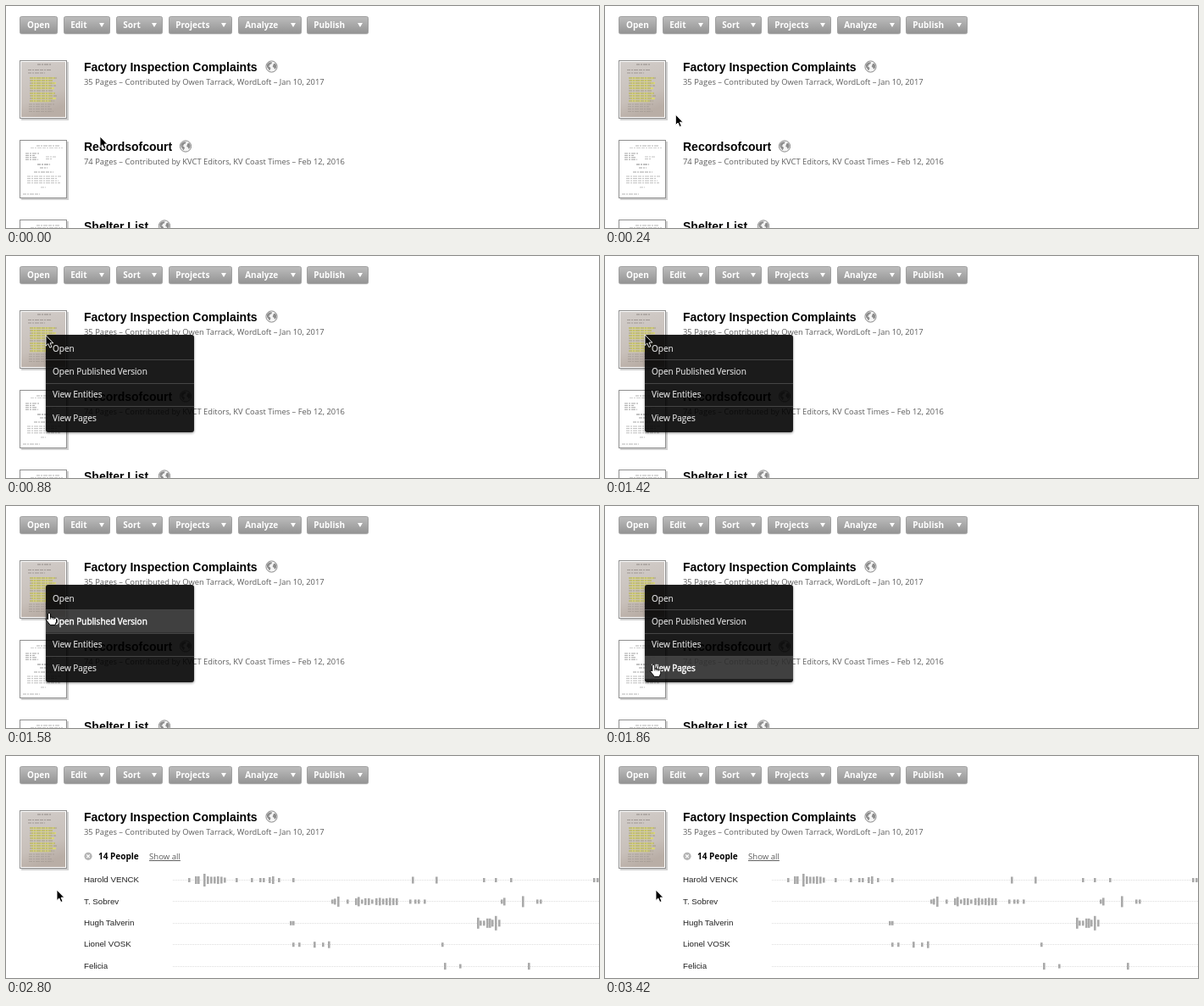
Write an HTML page that moves like this. It is 700 px wide and 262 px high and loops after 3.46 s.

```html
<!DOCTYPE html>
<html lang="en">
<head>
<meta charset="utf-8">
<title>Document list</title>
<style>
html, body { margin: 0; width: 100%; height: 100%; overflow: hidden; background: #fff; }
svg { display: block; }
text { font: 9.4px "Open Sans", sans-serif; white-space: pre; }
.title { font: bold 14px "Liberation Sans", Arial, sans-serif; }
.sub { fill: #5c5c5c; }
.button { font-size: 10px; font-weight: bold; fill: #fff; }
.name { font: 9.75px "Liberation Sans", Arial, sans-serif; fill: #222; }
.item { font-size: 10px; fill: #e4e4e4; stroke: #e4e4e4; stroke-width: .15; }
.item.on { fill: #fff; stroke: #fff; stroke-width: .45; }
</style>
</head>
<body>
<svg id="stage" width="700" height="262" viewBox="0 0 700 262">
  <defs>
    <linearGradient id="metal" x2="0" y2="1"><stop stop-color="#bdbdbd"/><stop offset="1" stop-color="#939393"/></linearGradient>
    <linearGradient id="photo" x2=".3" y2="1"><stop stop-color="#d2cdca"/><stop offset=".7" stop-color="#c8c0ba"/><stop offset="1" stop-color="#b9aea6"/></linearGradient>
    <filter id="soft" x="-10%" y="-10%" width="120%" height="125%"><feDropShadow dx="0" dy="1" stdDeviation="1.5" flood-opacity=".5"/></filter>
    <g id="globe">
      <circle r="6.6" fill="#f4f4f4" stroke="#8c8c8c"/>
      <path fill="#8c8c8c" d="M-5.5-2.5l2.5-2.5 3.5-.3-.5 2-2 .8-.3 1.5-1.7.5 2 1 1 1.5-1.5 3-1.5-2.5-1.5-2zM2.2-3l2-1 1.4 2.5v2.5l-1.8 2.5-1-2.2-1.6-1z"/>
    </g>
  </defs>
</svg>
<script>
const stage = document.getElementById('stage');
const LOOP = 3460, MENU_AT = 800, PANEL_AT = 2500;

const rect = (x, y, w, h, fill, more = '') =>
  `<rect x="${x}" y="${y}" width="${w}" height="${h}" fill="${fill}" ${more}/>`;
const text = (x, y, cls, s) => `<text x="${x}" y="${y}" class="${cls}">${s}</text>`;
const range = (n, f) => Array.from({ length: n }, (_, i) => f(i)).join('');

function button([label, x, w]) {
  const a = x + w - 13;
  return rect(x, 13, w, 20.6, '#d4d4d4', 'rx="2.5"') +
    rect(x + .5, 12.5, w - 1, 20, 'url(#metal)', 'rx="2" stroke="#a0a0a0"') +
    text(x + (label === 'Open' ? 9 : 8.2), 25.8, 'button', label) +
    (label === 'Open' ? '' : `<path d="M${a} 20h6l-3 5z" fill="#fff"/>`);
}

// A run of word-like dashes, n lines high.
const lines = (x, y, w, n, gap, colour, dash = '4 1 2 1 5 1') => range(n, i =>
  `<path d="M${x} ${y + i * gap}h${w - i * 5 % 7}" stroke="${colour}" stroke-width=".9" stroke-dasharray="${dash}"/>`);

function courtPage(y) {
  return lines(36, y + 7, 28, 1, 2, '#aaa') + lines(29, y + 9.5, 38, 1, 2, '#ccc') +
    lines(23, y + 16, 16, 4, 2.4, '#999') + lines(47, y + 20, 12, 2, 2.5, '#bbb') +
    lines(37, y + 29, 15, 1, 2, '#777') + lines(40, y + 33, 9, 1, 2, '#999') +
    lines(33, y + 38, 23, 1, 2, '#999') +
    lines(25, y + 43, 40, 4, 2.6, '#b5b5b5') + lines(41, y + 56, 6, 1, 2, '#bbb') +
    lines(20, y + 64, 20, 1, 2, '#aaa');
}

function photoPage(y) {
  const glow = (top, n) => range(n, i =>
    rect(28 + i % 3, y + top + i * 3, 30 - i * 4 % 7, 2.2, '#d9d674'));
  return rect(18, y + 2, 52, 65, 'url(#photo)') +
    lines(37, y + 5, 16, 1, 2, '#8b8480') +
    lines(26, y + 11.5, 28, 1, 2, '#9a928e') + lines(26, y + 15, 20, 1, 2, '#9a928e') +
    glow(20, 5) + glow(38, 4) +
    lines(28, y + 21, 32, 10, 3, '#a19a7c') + lines(27, y + 52, 30, 4, 2.8, '#a69d97');
}

const thumb = (y, page) =>
  rect(18, y + 2, 56, 69, '#d0d0d0') + rect(16.5, y + .5, 55, 68, '#fff', 'stroke="#8f8f8f"') + page(y);

function doc(i, title, sub, globeX) {
  const y = 94 * i;
  return thumb(64 + y, i ? courtPage : photoPage) +
    text(92, 76.5 + y, 'title', title) + text(92, 92.9 + y, 'sub', sub) +
    `<use href="#globe" x="${globeX}" y="${71.5 + y}"/>`;
}

// Each mark is "x" or "x:height".
const people = [
  ['Harold VENCK', '216 224:9 227:9 234:15 238:9 242:8 246:8 250:9 254:8 258:6 272 290 300 304 311:7 315:9 322 339 480:8 508:8 564 578 596 694 698'],
  ['T. Sobrev', '385 388:7 392:12 403 413:8 416:11 420 424:8 428:8 432 437:8 441:9 445:7 449:8 453:9 457:8 461:8 477 483 487 494 585 588:9 610:13 627 631'],
  ['Hugh Talverin', '336 339 557:13 560:6 564:6 568:11 571:11 574:8 578:17 582:8'],
  ['Lionel VOSK', '339 346 364:7 374 381:8 515'],
  ['Felicia', '518:8 536 617:8']
];

function personRow([name, marks], i) {
  const y = 146 + 25.4 * i;
  return text(92, y + 3.2, 'name', name) +
    `<path d="M197 ${Math.round(y) + .5}H700" stroke="#ddd" stroke-dasharray="1 1"/>` +
    marks.split(' ').map(m => {
      const [x, h = 5] = m.split(':').map(Number);
      return rect(x - 1, y + .5 - h / 2, 2.6, h, '#aaa');
    }).join('');
}

const items = ['Open', 'Open Published Version', 'View Entities', 'View Pages'];
const ROW = 27.3, rowTop = i => 95 + ROW * i;

const buttons = [
  ['Open', 16, 45], ['Edit', 68, 55], ['Sort', 130, 55],
  ['Projects', 192, 75], ['Analyze', 274, 75], ['Publish', 355, 73]
];

stage.innerHTML += buttons.map(button).join('') +
  doc(0, 'Factory Inspection Complaints', '35 Pages – Contributed by Owen Tarrack, WordLoft – Jan 10, 2017', 313.5) +
  '<g id="list">' +
    doc(1, 'Recordsofcourt', '74 Pages – Contributed by KVCT Editors, KV Coast Times – Feb 12, 2016', 212) +
    doc(2, 'Shelter List', '', 187) +
  '</g><g id="panel">' +
    '<circle cx="97" cy="118.3" r="4.6" fill="#b5b5b5"/><path d="M95.2 116.5l3.6 3.6m0-3.6l-3.6 3.6" stroke="#fff" stroke-width="1.2"/>' +
    '<text x="109" y="122" style="font-size:10px;font-weight:bold">14 People</text>' +
    '<text x="169" y="122" class="sub" style="font-size:9.6px;text-decoration:underline">Show all</text>' +
    people.map(personRow).join('') +
  '</g><g id="menu">' +
    rect(47, 93, 175, 115, '#000', 'rx="3" opacity=".89" filter="url(#soft)"') +
    rect(47, 0, 175, ROW, '#fff', 'id="glow" opacity=".16"') +
    range(3, i => rect(47, Math.round(rowTop(i + 1)), 175, 1, '#454545')) +
    items.map((s, i) => text(55, 112.6 + ROW * i, 'item', s)).join('') +
  '</g><g id="cursor">' +
    '<path id="arrow" d="M0 0v12.5l2.8-2.6 2 4.6 2.2-1-2-4.4h3.8z" stroke="#fff" stroke-width=".9"/>' +
    '<g id="hand" stroke="#000" fill="#fff"><path d="M-1.5 1q1.5-2 3 0v4l2 .3 2 .5 2 .6 1 1v3l-1.5 4h-6l-3-4-2-2.5q.5-1.5 2-.5l.5.6z"/>' +
    '<path d="M1.5 5v2.5M3.6 5.5v2M5.6 6v2" stroke-width=".8"/></g>' +
  '</g>';

const part = id => document.getElementById(id);
const show = (id, on) => part(id).setAttribute('display', on ? 'inline' : 'none');
const labels = [...document.querySelectorAll('.item')];

// time, x, y of the pointer tip
const path = [
  [0, 111, 154], [530, 47, 94], [1430, 47, 93], [1580, 51, 126], [1800, 57, 187],
  [1980, 58, 187], [2220, 61, 160], [2500, 61, 160], [2640, 60, 158], [LOOP, 60, 158]
];

function pointer(t) {
  const i = path.findIndex(p => p[0] > t);
  const [t0, x0, y0] = path[i - 1], [t1, x1, y1] = path[i];
  const k = (t - t0) / (t1 - t0), e = k * k * (3 - 2 * k);
  return [x0 + (x1 - x0) * e, y0 + (y1 - y0) * e];
}

function draw(t) {
  const [x, y] = pointer(t);
  const menu = t >= MENU_AT && t < PANEL_AT;
  const row = menu && x > 47 ? Math.floor((y - 95) / ROW) : -1;
  const hand = row >= 0 || (t < MENU_AT && x < 72 && y < 133);
  show('menu', menu);
  show('list', t < PANEL_AT);
  show('panel', t >= PANEL_AT);
  show('glow', row >= 0);
  part('glow').setAttribute('y', rowTop(row));
  labels.forEach((el, i) => el.classList.toggle('on', i === row));
  show('hand', hand);
  show('arrow', !hand);
  part('cursor').setAttribute('transform', `translate(${x} ${y})`);
}

const start = performance.now();
function tick() {
  draw((performance.now() - start) % LOOP);
  requestAnimationFrame(tick);
}
tick();
</script>
</body>
</html>
```
